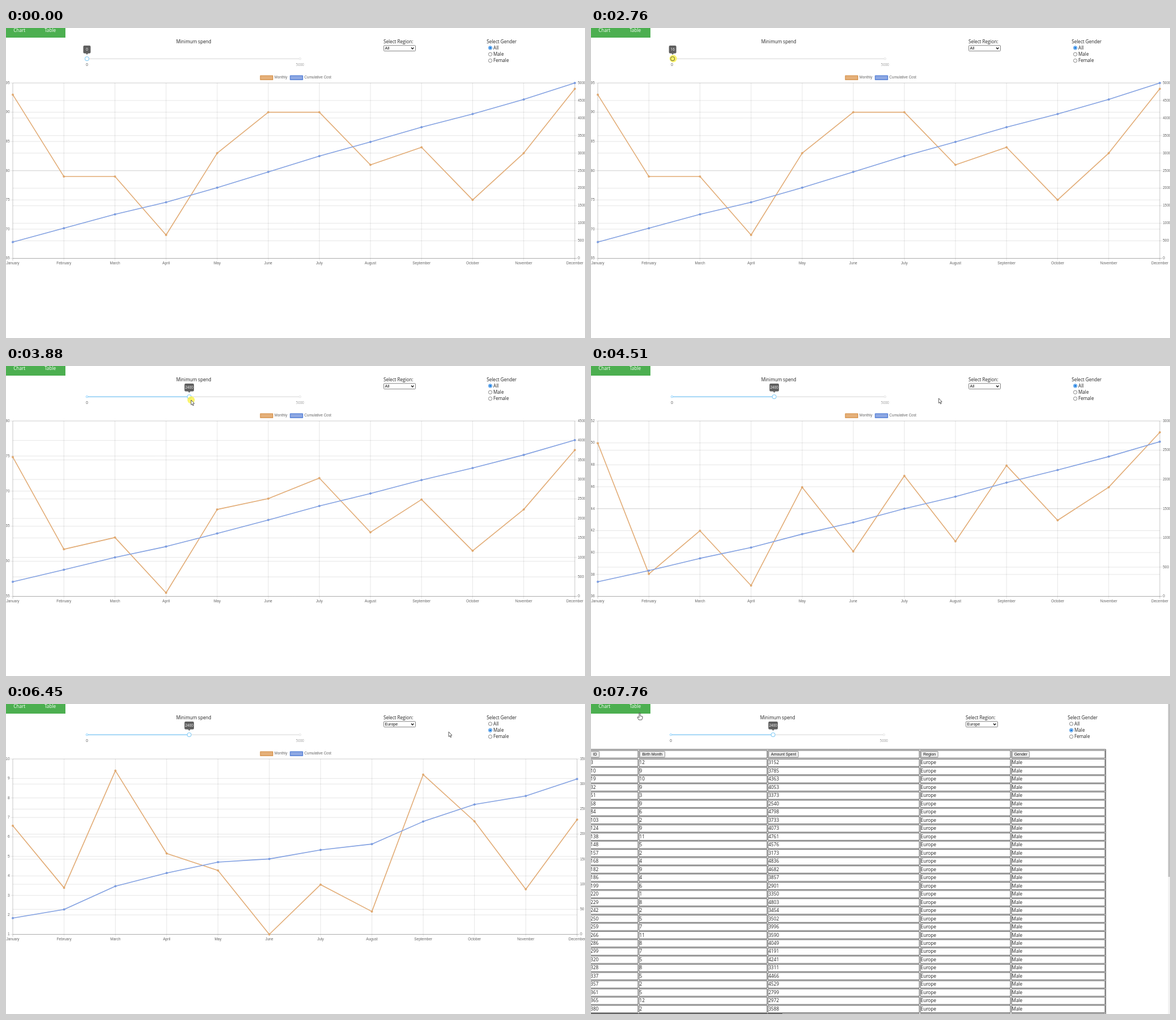
An HTML page with a canvas that plays this animation: 1023 by 547 pixels, repeating every 8000 ms.

```html
<!DOCTYPE html>
<html lang="en">
<head>
<meta charset="utf-8">
<title>Spend dashboard</title>
<style>
html, body { margin: 0; width: 100%; height: 100%; overflow: hidden; background: #fff; }
canvas { display: block; }
</style>
</head>
<body>
<canvas id="stage" width="1023" height="547"></canvas>
<script>
const c = document.getElementById('stage').getContext('2d');
const SANS = '"Open Sans", sans-serif', ARIAL = '"Liberation Sans", Arial, sans-serif';
const LOOP = 8000, TOP = 97, BOTTOM = 406.5, LEFT = 12;
const PRESS = 2760, RELEASE = 3880, FOCUS = 4800, EUROPE_AT = 5270, MALE_AT = 6164, TABLE_AT = 7600;
const ORANGE = ['#e5b07a', '#d99a58', '#e2ac76'], BLUE = ['#8ea8e3', '#5a84d8', '#83a1e1'];
const MONTHS = 'January February March April May June July August September October November December'.split(' ');

const mix = (a, b, p) => a + (b - a) * p;
const list = s => s.split(' ').map(Number);

// Chart.js-like axis: about ten steps of 1, 2 or 5 times a power of ten
function niceAxis(low, high) {
  const raw = (high - low) / 10, power = 10 ** Math.floor(Math.log10(raw));
  const step = power * [1, 2, 5, 10].find(n => n * power >= raw);
  return { min: Math.floor(low / step) * step, max: Math.ceil(high / step) * step, step };
}

function makeChart(at, monthly, end = 1005) {
  let sum = 0;
  const total = monthly.map(v => sum += v * 5);
  return { at, end, monthly, total,
    left: niceAxis(Math.min(...monthly), Math.max(...monthly)), right: niceAxis(0, sum) };
}

const everyone = list('93 79 79 69 83 90 90 81 84 75 83 94');
const spenders = list('50 38 42 37 46 40 47 41 48 43 46 51');
const charts = [
  makeChart(-2000, everyone),
  makeChart(3177, everyone.map((v, i) => mix(v, spenders[i], 1014 / 2400))),
  makeChart(3890, spenders),
  makeChart(EUROPE_AT, list('13 9 14.4 8 9 4 10 6.6 16.3 10.8 9 14'), 1009),
  makeChart(MALE_AT, list('6.5 3.1 10 5.7 4.3 1 3.1 2 9.3 7.3 3 6.7'), 1009)
];

let seed = 7, id = 0;
function random(low, high) {
  seed = seed * 16807 % 2147483647;
  return Math.floor(mix(low, high, seed / 2147483647));
}
const rows = Array.from({ length: 32 }, () =>
  [id += random(3, 23), random(1, 13), random(2400, 5000), 'Europe', 'Male']);

// time, x, y
const cursorKeys = [[190, 980, 545], [970, 117, 50], [1450, 22, 10], [1870, 76, 10], [2560, 145, 54],
  [PRESS, 145, 54], [3320, 222, 62], [RELEASE, 327, 60], [4130, 327, 60], [4510, 614, 57],
  [FOCUS, 712, 36], [EUROPE_AT, 690, 58], [5480, 698.5, 67], [6050, 856, 46], [6250, 856, 46],
  [6450, 783, 49], [7290, 86, 16]];
const spendKeys = [[2690, 0], [PRESS, 14], [3177, 1014], [3320, 1014], [RELEASE, 2400]];

function track(keys, t) {
  const i = keys.findIndex(k => k[0] > t);
  const b = keys.at(i), a = i > 0 ? keys[i - 1] : b;
  const p = a === b ? 0 : (t - a[0]) / (b[0] - a[0]);
  return a.slice(1).map((v, j) => mix(v, b[j + 1], p));
}

function text(s, x, y, size, color = '#222', font = SANS, align = 'left') {
  c.font = `${size}px ${font}`;
  c.fillStyle = color;
  c.textAlign = align;
  c.textBaseline = 'middle';
  c.fillText(s, x, y);
}

function paint(fill, stroke, width = 1) {
  if (fill) { c.fillStyle = fill; c.fill(); }
  if (stroke) { c.strokeStyle = stroke; c.lineWidth = width; c.stroke(); }
}

function path(points) {
  c.beginPath();
  points.forEach(([x, y]) => c.lineTo(x, y));
}

function line(x1, y1, x2, y2, color = 'rgba(0,0,0,.1)') {
  path([[x1, y1], [x2, y2]]);
  paint(null, color);
}

function box(x, y, w, h, fill, stroke, width, radius = 0) {
  c.beginPath();
  c.roundRect(x, y, w, h, radius);
  paint(fill, stroke, width);
}

function dot(x, y, r, fill, stroke, width) {
  c.beginPath();
  c.arc(x, y, r, 0, 7);
  paint(fill, stroke, width);
}

function slider(t, start) {
  const value = Math.round(track(spendKeys, t)[0]);
  const end = start + 376.5, x = start + value * .0753;
  const pressed = t >= PRESS && t < PRESS + 70, held = t >= PRESS && t < RELEASE;
  box(start, 53.2, end - start, 2, '#e8e8e8');
  box(start, 53.2, x - start, 2, '#a6d9fa');
  dot(start, 54.2, 1.7, '#fff', '#91d5ff');
  dot(end, 54.2, 1.7, '#fff', '#e4e4e4');
  text('0', start, 65, 6.3, '#444', SANS, 'center');
  text('5000', end, 65, 6.3, '#999', SANS, 'center');
  if (pressed) dot(x + 1, 54, 6.5, '#fbf36a');
  dot(x, 54.2, 3.4, pressed ? '#fbf36a' : '#fff', pressed ? '#77773a' : held ? '#6aa9e0' : '#85cdf6', 1.1);
  const half = Math.max(13, String(value).length * 3.6 + 2.3) / 2;
  box(x - half, 31, half * 2, 13.7, '#5f5f5f', null, 0, 2);
  path([[x - 2.5, 44.5], [x + 2.5, 44.5], [x, 47]]);
  paint('#5f5f5f');
  text(value, x, 38.2, 6.3, '#fff', SANS, 'center');
}

function controls(t) {
  const table = t >= TABLE_AT;
  box(0, 0, 105, 17, '#4caf50');
  text('Chart', 13.2, 5, 8.2, '#fff');
  text('Table', 68, 5, 8.2, '#fff');
  text('Minimum spend', table ? 298.7 : 300.7, 24.8, 8.15);
  slider(t, table ? 141 : 143);

  const rx = table ? 662 : 667, focused = t >= FOCUS && t < MALE_AT;
  text('Select Region:', rx, 24.8, 8.15);
  box(rx + .5, 30.8, 56, 9.8, '#fff', focused ? '#111' : '#767676', focused ? 1.6 : .9, 1);
  text(t < EUROPE_AT ? 'All' : 'Europe', rx + 2.5, 35.8, 7, '#111', ARIAL);
  path([[rx + 49, 34.5], [rx + 51.2, 37], [rx + 53.4, 34.5]]);
  paint(null, '#111', 1.2);

  const gx = table ? 842 : 849, chosen = t < MALE_AT ? 0 : 1;
  text('Select Gender', gx + .3, 24.8, 8.15);
  ['All', 'Male', 'Female'].forEach((label, i) => {
    const y = 35 + i * 11.3, on = i === chosen;
    dot(gx + 6.6, y, 3.1, '#fff', on ? '#0b75e0' : '#767676', .9);
    if (on) dot(gx + 6.6, y, 1.9, '#0b75e0');
    text(label, gx + 12, y + .6, 8.15);
  });
}

const level = (v, axis) => mix(BOTTOM, TOP, (v - axis.min) / (axis.max - axis.min));
const monthX = (i, state) => mix(LEFT, state.end, i / 11);

function series(from, to, p, key, side, [fill, edge, stroke]) {
  const points = to[key].map((v, i) => [
    mix(monthX(i, from), monthX(i, to), p),
    mix(level(from[key][i], from[side]), level(v, to[side]), p)]);
  path(points);
  c.lineJoin = 'round';
  paint(null, stroke, 1.6);
  points.forEach(q => dot(...q, 1.5, fill, edge, .8));
}

function scale(axis, x1, x2, labelX, align) {
  for (let v = axis.min; v <= axis.max; v += axis.step) {
    const y = level(v, axis);
    line(x1, y, x2, y, v ? undefined : 'rgba(0,0,0,.25)');
    text(v, labelX, y, 6.5, '#666', ARIAL, align);
  }
}

function legend(label, x, [fill, edge]) {
  box(x, 84.2, 21.8, 7, fill, edge, 1.5);
  text(label, x + 24.8, 87.5, 6.5, '#666', ARIAL);
}

function chart(t) {
  const n = charts.findLastIndex(s => s.at <= t);
  const state = charts[n], from = charts[Math.max(0, n - 1)];
  const p = 1 - (1 - Math.min(1, (t - state.at) / 1000)) ** 4;
  legend('Monthly', 449.5, ORANGE);
  legend('Cumulative Cost', 502.3, BLUE);
  MONTHS.forEach((name, i) => {
    const x = monthX(i, state);
    line(x, TOP, x, BOTTOM + 4, i % 11 ? undefined : 'rgba(0,0,0,.22)');
    text(name, x, 415.5, 6.5, '#666', ARIAL, 'center');
  });
  scale(state.left, LEFT - 4, state.end, 6.6, 'right');
  scale(state.right, LEFT, state.end + 4, state.end + 5.2, 'left');
  series(from, state, p, 'monthly', 'left', ORANGE);
  series(from, state, p, 'total', 'right', BLUE);
}

const columns = [
  { label: 'ID', x: -1.5, end: 83, button: 15 },
  { label: 'Birth Month', x: 85, end: 311, button: 44.5 },
  { label: 'Amount Spent', x: 312.8, end: 580, button: 52.5 },
  { label: 'Region', x: 582, end: 741, button: 30 },
  { label: 'Gender', x: 743, end: 908, button: 30.5 }
];

function table() {
  const cell = (col, y, h) => box(col.x, y, col.end - col.x, h, null, '#4a4a4a', .9);
  box(-22, 80, 931.5, 480, null, '#555');
  columns.forEach((col, j) => {
    cell(col, 82, 13.4);
    box(col.x + 1.1, 83.7, col.button, 10.2, '#efefef', '#767676', .8, 1);
    text(col.label, col.x + 1.1 + col.button / 2, 89, 7, '#111', ARIAL, 'center');
    rows.forEach((row, i) => {
      const y = 97.4 + i * 14.48;
      cell(col, y, 12.8);
      text(row[j], col.x + .6, y + 6.9, 8.2);
    });
  });
  box(1019.5, 0, 3.5, 547, '#f1f1f1');
  box(1019.8, 0, 3.2, 305, '#c1c1c1');
}

const ARROW = [[0, 0], [0, 8.6], [1.9, 7], [3.2, 10], [4.6, 9.4], [3.3, 6.4], [5.8, 6.2]];
const HAND = [[-1, 0], [1, 0], [1, 5], [5, 6], [5, 9], [3.5, 12], [-1.5, 12], [-4, 8], [-3.4, 6.6], [-1, 8]];

function cursor(t) {
  if (t < 190 || (t >= 2520 && t < PRESS + 70)) return;
  const [x, y] = track(cursorKeys, t);
  const clicks = [[PRESS, RELEASE + 70], [EUROPE_AT, 5400], [MALE_AT, 6350]];
  if (clicks.some(([a, b]) => t >= a && t < b)) dot(x, y, 6.5, 'rgba(250,240,60,.75)');
  const overTabs = x < 105 && y < 17;
  path((overTabs ? HAND : ARROW).map(([px, py]) => [x + px, y + py]));
  c.closePath();
  paint('#fff', '#333', .8);
}

function draw() {
  const t = performance.now() % LOOP;
  c.fillStyle = '#fff';
  c.fillRect(0, 0, 1023, 547);
  controls(t);
  if (t < TABLE_AT) chart(t); else table();
  if (t >= 7290) box(0, 546, 338, 1, '#111');
  else if (t >= 1300 && t < 1930) box(0, 546, 115, 1, '#999');
  cursor(t);
  requestAnimationFrame(draw);
}
draw();
</script>
</body>
</html>
```
